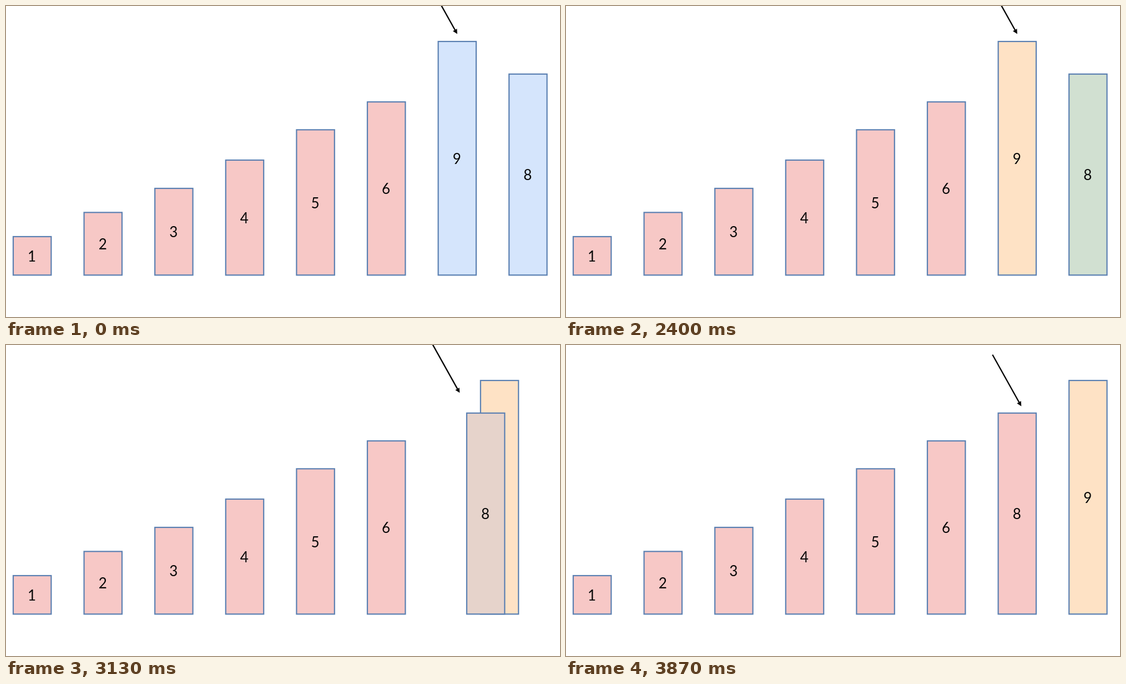
An HTML page that plays this animation: 998x561 px, repeating every 4.87 s.

```html
<!DOCTYPE html>
<html lang="en">
<head>
<meta charset="utf-8">
<title>Selection sort</title>
<style>
  html, body { margin: 0; width: 100%; height: 100%; overflow: hidden; background: #fff; }
  svg { display: block; width: 998px; height: 561px; }
  rect { stroke: #5b80b2; stroke-width: 2.2; }
  text { font: 26px Lato, Carlito, sans-serif; text-anchor: middle; fill: #080808; }
</style>
</head>
<body>
<svg id="stage" viewBox="0 0 998 561">
  <g id="arrow">
    <path d="M-52-93L-4-7" stroke="#080808" stroke-width="2.4"/>
    <path d="M0 0L-8-5.2L-.6-9.4Z" fill="#080808"/>
  </g>
</svg>
<script>
const LOOP = 4870, STEP = 200 / 3;
const BASE = 485.4, WIDTH = 68.4, FIRST = 47.2, GAP = 127.6;
const PINK = [247, 200, 198], BLUE = [213, 229, 252],
      ORANGE = [254, 226, 197], GREEN = [208, 225, 209];

const stage = document.getElementById('stage');
const arrow = document.getElementById('arrow');

function add(parent, tag, attrs) {
  const el = document.createElementNS('http://www.w3.org/2000/svg', tag);
  for (const key in attrs) el.setAttribute(key, attrs[key]);
  return parent.appendChild(el);
}

function makeBar(label, top, slot) {
  const g = add(stage, 'g');
  const rect = add(g, 'rect', { x: -WIDTH / 2, y: top, width: WIDTH, height: BASE - top });
  add(g, 'text', { x: -0.6, y: (top + BASE) / 2 + 10.2 }).textContent = label;
  const bar = {
    move: s => g.setAttribute('transform', `translate(${FIRST + GAP * s})`),
    paint: rgb => rect.setAttribute('fill', `rgb(${rgb})`)
  };
  bar.move(slot);
  bar.paint(PINK);
  return bar;
}

const bars = [[1, 416], [2, 372.4], [3, 329], [4, 278], [5, 223.3], [6, 173], [9, 64], [8, 122.8]]
  .map(([label, top], slot) => makeBar(label, top, slot));
const [nine, eight] = bars.slice(6);

const progress = (t, start, length) => Math.min(1, Math.max(0, (t - start) / length));
const mix = (a, b, u) => a.map((v, i) => Math.round(v + (b[i] - v) * u));
const ease = u => u * u * u * (u * (6 * u - 15) + 10);

function draw(t) {
  const swap = progress(t, 2360, 1400), p = ease(swap);
  nine.paint(mix(BLUE, ORANGE, progress(t, 300, 1030)));
  eight.paint(swap > 0 ? mix(GREEN, PINK, swap) : mix(BLUE, GREEN, progress(t, 1330, 1030)));
  nine.move(6 + p);
  eight.move(7 - p);
  arrow.setAttribute('transform', `translate(${813 + 7.3 * p} ${50.5 + 60 * p})`);
}

// The picture advances at 15 steps per second.
function tick() {
  const t = performance.now() % LOOP;
  draw(Math.floor((t + 5) / STEP) * STEP);
  requestAnimationFrame(tick);
}
tick();
</script>
</body>
</html>
```
